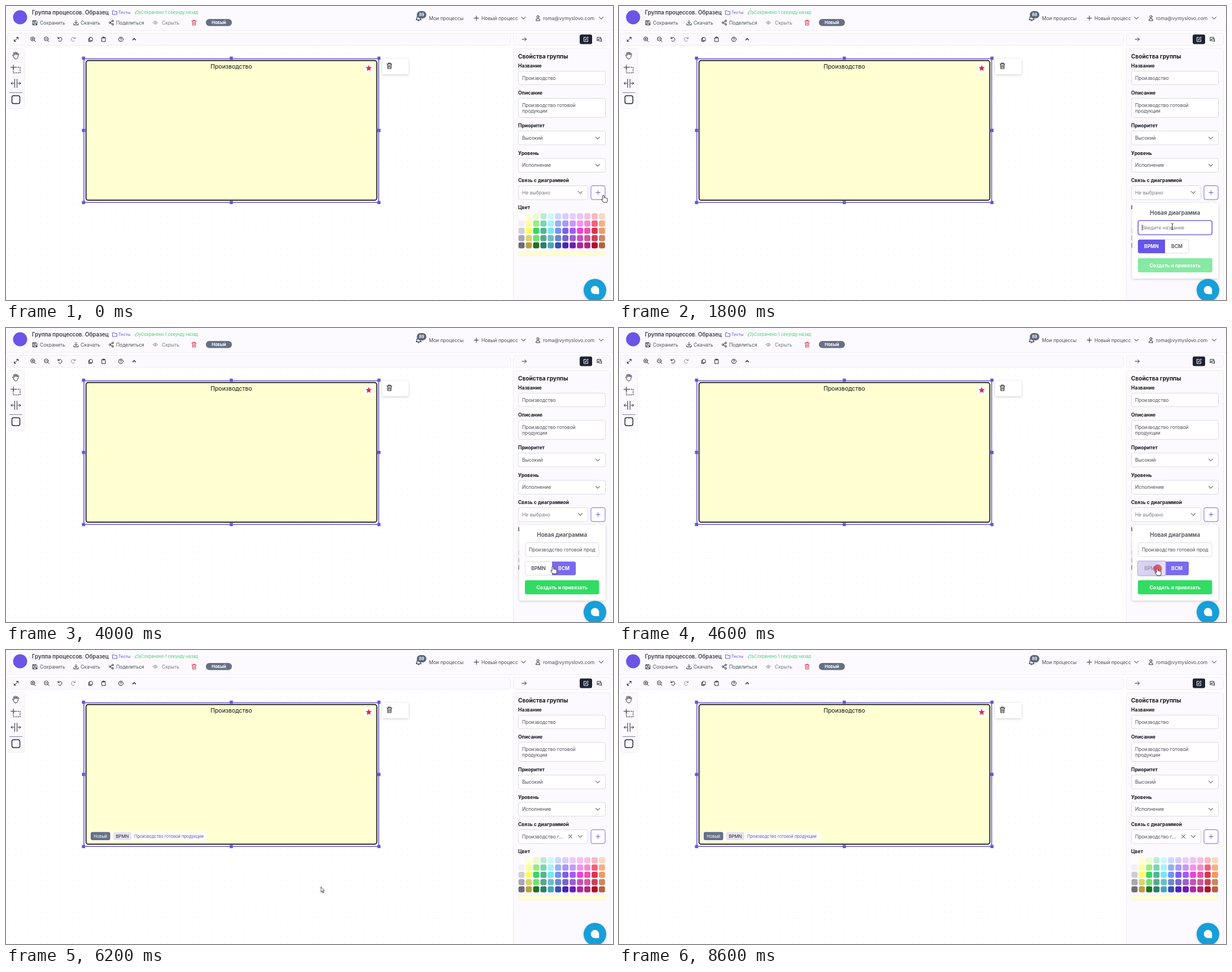
An HTML page for the animation above (8800 ms loop, 1075 by 521 pixels).

```html
<!DOCTYPE html>
<html lang="ru">
<head>
<meta charset="utf-8">
<title>Группа процессов</title>
<style>
html, body { margin: 0; width: 100%; height: 100%; overflow: hidden; background: #fff; }
svg { display: block; }
#stage { width: 1075px; height: 521px; font: 400 8.5px Inter, "Noto Sans", sans-serif; }
text { fill: #4b4d58; }
.b { font-weight: 700; font-size: 8.6px; fill: #17171f; }
.w { fill: #fff; }
.c { text-anchor: middle; }
.i { fill: none; stroke: #252936; stroke-width: 1; stroke-linecap: round; stroke-linejoin: round; }
.pale { stroke: #8b8d98; }
.bar { fill: #fcfaff; stroke: #efebf5; }
.box { fill: #fff; stroke: #dcdae2; }
.soft { filter: drop-shadow(0 1px 2px #0003); }

[data-on] { animation: 8.8s step-end infinite; }
#pointer { animation: travel 8.8s infinite; }
@keyframes travel {
  0% { transform: translate(1058px, 335px); animation-timing-function: steps(2); }
  4.53%, 11.35% { transform: translate(1049px, 330px); animation-timing-function: steps(3); }
  18.17%, 27.26% { transform: translate(980px, 391px); animation-timing-function: steps(4); }
  36.35%, 43.17% { transform: translate(976px, 421px); animation-timing-function: steps(3); }
  49.99%, 54.53% { transform: translate(953px, 425.5px); animation-timing-function: steps(2); }
  59.08%, 63.62% { transform: translate(965.5px, 457px); animation-timing-function: steps(3); }
  70.44% { transform: translate(557.5px, 419.5px); animation-timing-function: steps(4); }
  79.53%, 88.62% { transform: translate(540px, 440px); animation-timing-function: steps(2); }
  93.17%, 100% { transform: translate(530px, 530px); }
}
</style>
</head>
<body>
<svg id="stage" viewBox="0 0 1075 521">
  <defs>
    <pattern id="dots" width="11.2" height="11.2" patternUnits="userSpaceOnUse">
      <circle cx="6" cy="5" r=".6" fill="#e6e5ea"/>
    </pattern>
    <path id="down" d="M-3.5-2 0 1.8 3.5-2" class="i"/>
    <g id="bin" fill="none" stroke-linecap="round" stroke-linejoin="round">
      <path d="M-4-3H4M-1.5-3v-1.5h3V-3M-3-3l.4 7.5h5.2L3-3M-1-.8v3.4M1-.8v3.4"/>
    </g>
    <g id="lens" class="i"><circle cx="-.7" cy="-.7" r="3.5"/><path d="M2 2 4.3 4.3M-2.3-.7H.9"/></g>
    <path id="turn" class="i" d="M-3.5-3.8v2.6h2.6M-3.2-1.4A3.5 3.5 0 1 1-2.5 2.6"/>
    <linearGradient id="fade">
      <stop stop-color="#dcd6f3"/><stop offset=".6" stop-color="#d5cff0"/><stop offset="1" stop-color="#e9e5f8"/>
    </linearGradient>
  </defs>

  <rect y="70" width="896" height="451" fill="url(#dots)"/>

  <!-- header -->
  <rect width="1075" height="43" fill="#fcfaff"/>
  <path d="M0 43.5H1075" stroke="#f0edf5"/>
  <circle cx="25" cy="20" r="12.5" fill="#6a55e6"/>
  <text x="46" y="15" font-size="9.7" font-weight="600" style="fill:#383a45">Группа процессов. Образец</text>
  <path class="i" d="M189 8.5h2.5l1 1.2h4v5.300h-7.500z" style="stroke:#6757dc"/>
  <text x="199" y="14.300" font-size="7.3" style="fill:#6757dc">Тесты</text>
  <path class="i" d="M230.500 14.500a2 2 0 0 1 0-4 2.700 2.700 0 0 1 5-.5 2.200 2.200 0 0 1 .5 4.500M232 12.500l1.200 1.200 2-2.300" style="stroke:#45cf6c"/>
  <text x="239" y="14.300" font-size="7.5" style="fill:#45cf6c">Сохранено 1 секунду назад</text>
  <path class="i" d="M47.500 26h5.800l1.700 1.700v5.800h-7.500zM49 26v2.300h3V26M49 33.500v-3h4.500v3"/>
  <text x="60" y="32.700">Сохранить</text>
  <path class="i" d="M124 25.500v5.500M121.500 28.800l2.500 2.400 2.500-2.400M120 31v2.500h8V31"/>
  <text x="132" y="32.700" font-size="8.7">Скачать</text>
  <g class="i"><circle cx="184" cy="29.500" r="1.500"/><circle cx="189" cy="26.500" r="1.500"/><circle cx="189" cy="32.500" r="1.500"/><path d="M185.400 28.700 187.600 27.300M185.400 30.300 187.600 31.700"/></g>
  <text x="195" y="32.700">Поделиться</text>
  <g class="i pale"><path d="M260.500 29.500q4-5.500 8 0-4 5.500-8 0z"/><circle cx="264.500" cy="29.500" r="1.200"/></g>
  <text x="276" y="32.700" style="fill:#777985">Скрыть</text>
  <use href="#bin" x="333" y="29.500" stroke="#df3c50"/>
  <rect x="354" y="23" width="46" height="12.500" rx="6" fill="#667085"/>
  <text class="b w c" x="377" y="32" font-size="7.600" style="font-size:7.6px">Новый</text>

  <path class="i" d="M726.500 24.500q1.300-1.500 1.300-4a3 3 0 0 1 6 0q0 2.500 1.300 4zM729.500 26h2.500" style="stroke-width:1.200"/>
  <rect x="727.500" y="9" width="17" height="13" rx="6.500" fill="#5c667b"/>
  <text class="b w c" x="736" y="18" style="font-size:7px">89</text>
  <text x="749" y="25">Мои процессы</text>
  <path class="i" d="M829 21.500h8M833 17.500v8"/>
  <text x="842" y="25">Новый процесс</text>
  <use href="#down" x="916.500" y="21.500"/>
  <g class="i"><circle cx="942" cy="19" r="2"/><path d="M938.500 25.500q0-3.500 3.500-3.500t3.500 3.500z"/></g>
  <text x="951" y="25">roma@vymyslovo.com</text>
  <use href="#down" x="1054" y="21.500"/>

  <!-- toolbars -->
  <rect class="bar" x="2.500" y="48.500" width="891" height="21" rx="3"/>
  <rect class="bar" x="898.500" y="48.500" width="172" height="21" rx="3"/>
  <rect class="bar" x="898.500" y="75.500" width="172" height="450" rx="3"/>
  <rect class="bar" x="3.500" y="75.500" width="29" height="106" rx="3"/>
  <path class="i" d="M14.500 62.500l7-7M18.500 55.500h3v3M14.500 59.500v3h3"/>
  <use href="#lens" x="48" y="59"/><path class="i" d="M47.300 56.700v3.200"/>
  <use href="#lens" x="72" y="59"/>
  <use href="#turn" x="95.500" y="59"/>
  <use href="#turn" transform="translate(119 59)scale(-1 1)" opacity=".5"/>
  <path class="i" d="M148 57.500h-1.500v5.500h4.500v-1.500M148.500 55.500h3l1.500 1.500v4.500h-4.500z"/>
  <path class="i" d="M170 56h6v7h-6zM171.700 55h2.600v1.800h-2.600z"/>
  <g class="i"><circle cx="203.500" cy="59" r="4"/><path d="M202.200 58q0-1.300 1.300-1.300t1.300 1.200-1.300 1.500M203.500 61.100v.1"/></g>
  <path class="i" d="M224.500 60.200 227 57.500l2.500 2.700" style="stroke-width:1.300"/>
  <path class="i" d="M914 59h7.500M918.500 56l3 3-3 3"/>
  <rect x="1016" y="50.500" width="22" height="17" rx="3" fill="#1d2233"/>
  <path class="i" d="M1027 55.500h-3.500v7.500h7v-3.500M1026 60.300l.3-1.600 3.800-3.900 1.400 1.400-3.900 3.800z" style="stroke:#fff"/>
  <path class="i" d="M1047 61.500v-6h6.500v3M1047 61.500l1.500-1.500M1049.500 58.500h5v4.500l-1.500-1.200h-3.500z"/>

  <path class="i" d="M13.500 90.500l-2-3.500q.8-1.200 2 .3l.8.700-1-4.800q1-1.200 1.700.2l.8 3-.1-4.300q1-1.200 1.800 0l.3 4.200 1-3.700q1.200-.8 1.700.4l-.7 4 1.500-2.600q1.300-.3 1.300.9l-2 6.200q-1 2.500-3.500 2.500-2.300 0-3.600-3.500z" style="stroke-width:.9"/>
  <path class="i" d="M13 108.500h12v10H13z" stroke-dasharray="2 2"/>
  <path class="i" d="M8.500 108.500h8M13 104.500v8"/>
  <path class="i" d="M15.500 129.500v15M19.500 129.500v15M9 137h5M21 137h5M11 135l-2 2 2 2M24 135l2 2-2 2"/>
  <path d="M6 153.500h23" stroke="#8179b5"/>
  <rect class="i" x="10.500" y="159" width="14" height="14" rx="3" style="stroke-width:1.500"/>

  <!-- group on the canvas -->
  <rect x="138" y="93.500" width="522" height="254.500" fill="#fff" stroke="#6c5bd6" stroke-width="1.600"/>
  <rect x="141.700" y="96.700" width="515" height="247.500" rx="4" fill="#ffffd2" stroke="#101010" stroke-width="1.700"/>
  <g id="grips" fill="#6555dc"></g>
  <text class="c" x="399" y="110.500" font-size="10.500" style="fill:#101010">Производство</text>
  <rect x="634" y="101" width="17.500" height="17.500" rx="3" fill="#fffef6"/>
  <path id="star" fill="#dc2c44"/>
  <rect class="soft" x="666" y="93.500" width="47" height="27.500" rx="2" fill="#fff"/>
  <use href="#bin" transform="translate(679 106)scale(1.1)" stroke="#222"/>
  <g data-on="6000-8800">
    <rect x="147" y="320.500" width="210" height="18.500" rx="3" fill="#fffff0"/>
    <rect x="150" y="322.500" width="34.500" height="14.500" rx="3" fill="#667085"/>
    <text class="w c" x="167.300" y="332.500" font-size="7.400">Новый</text>
    <rect x="190" y="322.500" width="32" height="14.500" rx="3" fill="#e7e4ee"/>
    <text class="c" x="206" y="332.700" font-size="7.800" style="fill:#20222c">BPMN</text>
    <text x="227" y="332.500" font-size="7.360" style="fill:#6353d8">Производство готовой продукции</text>
  </g>

  <!-- properties -->
  <text class="b" x="907" y="93" style="font-size:10.100px">Свойства группы</text>
  <g id="fields"></g>
  <text x="914" y="130.500">Производство</text>
  <text x="914" y="178.500">Производство готовой</text>
  <text x="914" y="189">продукции</text>
  <text x="914" y="237">Высокий</text>
  <text x="914" y="285.300">Исполнение</text>
  <g data-on="0-6000"><text x="914" y="333.500" style="fill:#777985">Не выбрано</text></g>
  <g data-on="6000-8800">
    <text x="914" y="333.500">Производство г...</text>
    <path class="i" d="M996.500 327.500l6 6M1002.500 327.500l-6 6"/>
  </g>
  <use href="#down" x="1048" y="234"/>
  <use href="#down" x="1048" y="282.300"/>
  <use href="#down" x="1017" y="330.500"/>
  <rect x="1036" y="318.500" width="25" height="24.500" rx="3" fill="#fff" stroke="#7668dc"/>
  <path d="M1044.500 330.500h8M1048.500 326.500v8" stroke="#6757dc"/>
  <g id="swatches"></g>
  <rect x="907.500" y="435" width="153.500" height="8" rx="2.500" fill="#ffffd2" stroke="#f0efd8" stroke-width=".6"/>

  <!-- new diagram -->
  <g data-on="800-6000">
    <g class="soft" fill="#fff">
      <path d="M1043.500 350l5-5 5 5z"/>
      <rect x="908.700" y="349" width="153" height="134" rx="3"/>
    </g>
    <text class="c" x="984.700" y="369.500" font-size="9.900" font-weight="600">Новая диаграмма</text>
    <rect class="box" x="919.500" y="380.500" width="130.500" height="24.500" rx="3"/>
    <g data-on="1600-3600" fill="none">
      <rect x="918.500" y="379.500" width="132.500" height="26.500" rx="4" stroke="#cfc8f8" stroke-width="1.500"/>
      <rect x="919.500" y="380.500" width="130.500" height="24.500" rx="3" stroke="#6a58e0" stroke-width="1.200"/>
    </g>
    <g data-on="0-2200"><text x="926" y="396" style="fill:#7d7f8a">Введите название</text></g>
    <path data-on="1600-2200" d="M926.500 387.500v11" stroke="#333" stroke-width=".8"/>
    <svg x="926" y="382" width="118" height="22">
      <g data-on="2200-3600"><text x="117.500" y="14" text-anchor="end">Производство готовой продукции</text></g>
      <g data-on="3600-8800"><text y="14">Производство готовой продукции</text></g>
    </svg>

    <rect class="box" x="919.500" y="414" width="89.500" height="24" rx="3"/>
    <rect data-on="3000-3800" x="967" y="414.500" width="41.500" height="23" rx="3" fill="#f8f7fa"/>
    <text class="b c" x="988" y="429" style="fill:#4b4d58;font-weight:600">BCM</text>
    <g data-on="0-3800 4800-8800">
      <path d="M967 414v24h-45q-3 0-3-3v-18q0-3 3-3z" fill="#6655e8"/>
      <text class="b w c" x="943" y="429">BPMN</text>
    </g>
    <g data-on="3800-4800">
      <path d="M967 414h39q3 0 3 3v18q0 3-3 3h-39z" fill="#7a6aee"/>
      <text class="b w c" x="988" y="429">BCM</text>
    </g>
    <g data-on="3800-4600"><text class="b c" x="943" y="429" style="fill:#4b4d58;font-weight:600">BPMN</text></g>
    <g data-on="4600-4800">
      <rect x="918.500" y="413" width="49.500" height="26" rx="3" fill="url(#fade)" stroke="#bdb4ee" stroke-width="1.300"/>
      <text class="c" x="943" y="429" style="fill:#7f7a92">BPMN</text>
    </g>

    <rect x="919" y="447" width="131.500" height="25" rx="3" fill="#32dc64"/>
    <rect data-on="0-2200" x="919" y="447" width="131.500" height="25" rx="3" fill="#87e9a3"/>
    <g data-on="0-5600"><text class="b w c" x="984.700" y="462.700">Создать и привязать</text></g>
    <g data-on="5600-6000">
      <rect x="918" y="446" width="133.500" height="27" rx="4" fill="#7cc693" stroke="#c5f3d2" stroke-width="2"/>
      <path d="M1032 447v25H922q-3 0-3-3v-19q0-3 3-3z" fill="#a2d8b3"/>
      <path d="M935 455.500a4 4 0 1 0 4 4" fill="none" stroke="#fff"/>
      <text class="b w c" x="989.500" y="462.700">Создать и привязать</text>
    </g>
  </g>

  <!-- chat button -->
  <circle class="soft" cx="1043" cy="503.500" r="20" fill="#169fd8"/>
  <path d="M1043 496a7.300 7.300 0 0 1 7.300 7.300v7.300h-7.300a7.300 7.300 0 0 1 0-14.600z" fill="#fff"/>

  <!-- pointer -->
  <g id="pointer" stroke-linejoin="round">
    <circle data-on="600-800 1600-1800 3600-3800 4600-4800 5600-5800" cx="1" cy="1" r="7" fill="#e0364f" fill-opacity=".78" stroke="#c6405a" stroke-width=".8"/>
    <path data-on="0-1400 3000-5600" fill="#fff" stroke="#222" stroke-width=".9"
      d="M-1.300 1q1.300-2 2.600 0V5q1.200-1 2.100.2 1.400-.8 2 .4 1.700-.4 1.700 1.200v3q0 1.500-1 3.200H0L-3.300 8.500q-.6-1.500.7-1.500l1.300 1.200z"/>
    <path data-on="1400-3000" fill="none" stroke="#222" stroke-width=".9" d="M-2-5.500q2 0 2 1.500V4q0 1.500-2 1.500M2-5.500q-2 0-2 1.500M0 4q0 1.500 2 1.500"/>
    <path data-on="5600-8200" fill="#fff" stroke="#222" stroke-width=".9" d="M0 0v9.800l2.200-2 1.500 3.200 1.500-.7-1.500-3.100h2.900z"/>
  </g>
</svg>
<script>
const LOOP = 8800;
const put = (id, html) => { document.getElementById(id).innerHTML = html; };

// Property labels and boxes: label, baseline, top, height, width
put('fields', [
  ['Название', 108.5, 115.5, 24, 154],
  ['Описание', 157, 163.5, 34, 154],
  ['Приоритет', 215.3, 221.5, 24.5, 154],
  ['Уровень', 263.5, 270, 24.5, 154],
  ['Связь с диаграммой', 312, 318.5, 24.5, 123],
  ['Цвет', 360]
].map(([label, base, top, h, w]) => `<text class="b" x="907" y="${base}">${label}</text>` +
  (top ? `<rect class="box" x="907.5" y="${top}" width="${w}" height="${h}" rx="3"/>` : '')).join(''));

const palette = `
  fff ffffd6 ecfad2 bfe9d6 ccf7fb cdd9fb d9ccfb e8cdfb eec3f7 f6c0e0 f9b7c3 f8d9c0
  f2eff6 ffff99 9aec7c 76d6b4 a8f1fa 94b0f2 ab97f6 c797f9 f48ff0 f68bcb f4607a f6b082
  cfcdd6 ffff57 35d95c 4fb791 73e8f5 6f95f6 7c5cf5 a05cf8 ef3ee3 f050ae e0334b f09a60
  a9a6b0 d9d36e 6ee46e 55a88c 6abcca 6a87cf 7764d0 9a5fd2 c94ec0 d4559f cb4257 cc8862
  6e6b74 b9a13e 22701f 2e7f68 46a6b8 3451b4 4a22b8 6b1db4 b024a8 b32878 b30d25 b5633a`;
put('swatches', palette.trim().split(/\s+/).map((hex, i) =>
  `<rect x="${907.6 + i % 12 * 12.95}" y="${367.2 + Math.floor(i / 12) * 12.9}" width="10.8" height="10.8" rx="3" fill="#${hex}"/>`).join(''));

put('grips', [137.3, 399, 660.5].flatMap(x => [92.5, 220.5, 348.3].map(y => [x, y]))
  .filter(([x, y]) => x !== 399 || y !== 220.5)
  .map(([x, y]) => `<rect x="${x - 2.8}" y="${y - 2.8}" width="5.6" height="5.6"/>`).join(''));

const tips = Array.from({ length: 10 }, (_, i) => {
  const r = i % 2 ? 2.6 : 5.8, a = i * Math.PI / 5;
  return `${642.4 + r * Math.sin(a)} ${110.3 - r * Math.cos(a)}`;
});
document.getElementById('star').setAttribute('d', `M${tips.join('L')}Z`);

// data-on lists the spans, in ms, in which a part is shown
const at = ms => (ms >= LOOP ? 100 : Math.max(0, (ms - 1) / LOOP * 100)).toFixed(3) + '%';
const sheet = document.styleSheets[0];
document.querySelectorAll('[data-on]').forEach((el, i) => {
  const steps = el.dataset.on.split(' ').map(span => {
    const [from, to] = span.split('-').map(Number);
    return `${at(from)}{opacity:1}${at(to)}{opacity:0}`;
  });
  sheet.insertRule(`@keyframes on${i}{0%{opacity:0}${steps.join('')}100%{opacity:0}}`, sheet.cssRules.length);
  el.style.animationName = `on${i}`;
});
</script>
</body>
</html>
```
